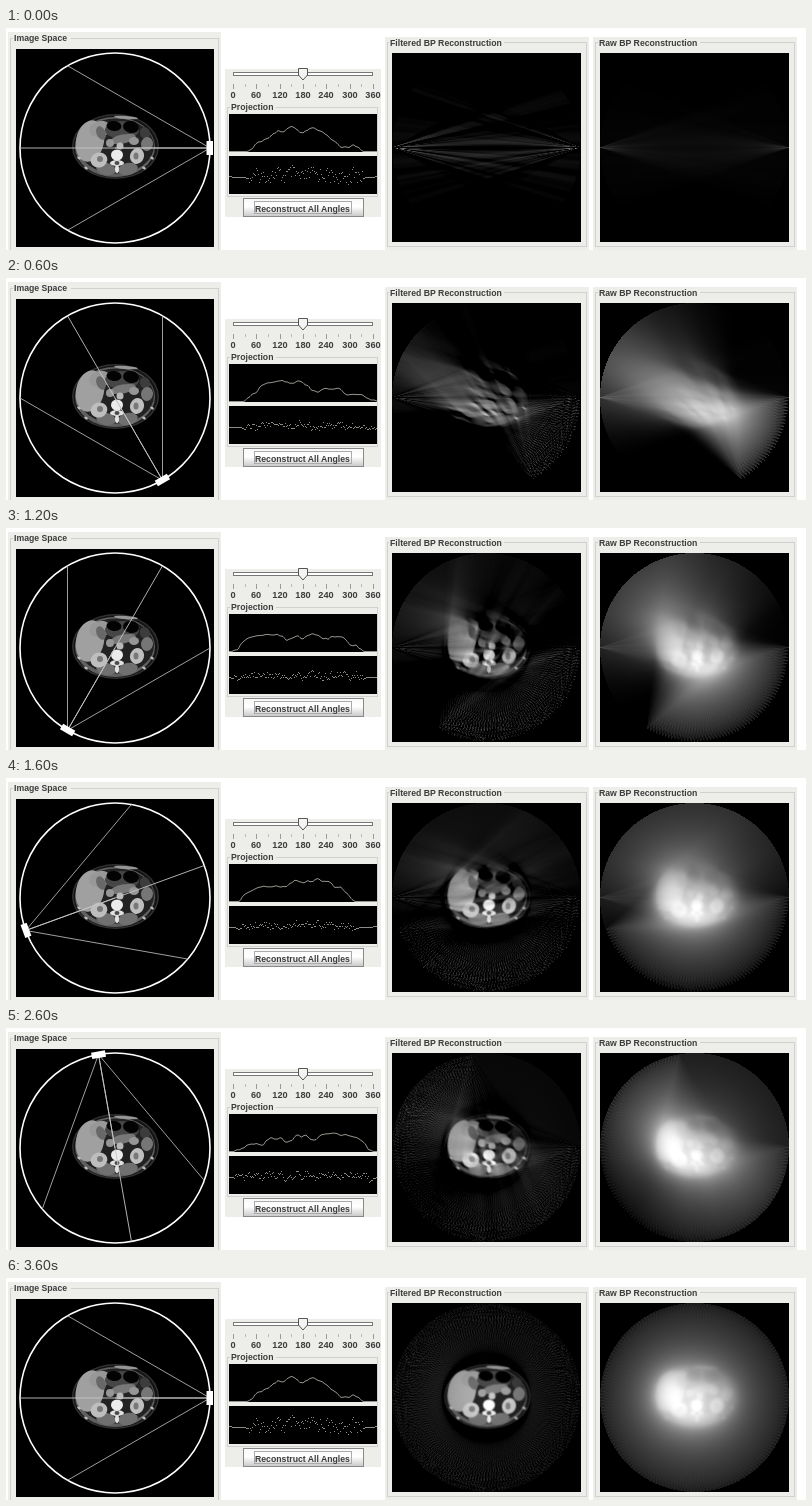
An HTML page with a canvas that plays this animation: 800x222 px, repeating every 3.8 s.

```html
<!DOCTYPE html>
<html lang="en">
<head>
<meta charset="utf-8">
<title>Fan-beam CT reconstruction</title>
<style>
  html, body { margin: 0; width: 100%; height: 100%; overflow: hidden; background: #fff; }
  svg, canvas { position: absolute; left: 0; top: 0; width: 800px; height: 222px; display: block; }
  text { font: bold 8.7px "Liberation Sans", Arial, sans-serif; fill: #3c3c3c; }
  .tick { font-size: 9.2px; text-anchor: middle; }
  .panel, .label { fill: #edeeea; }
  .border { fill: none; stroke: #d0d0d0; }
</style>
</head>
<body>
<svg viewBox="0 0 800 222">
  <rect class="panel" x="2" y="4" width="213" height="218"/>
  <rect class="panel" x="219" y="41" width="156" height="148"/>
  <rect class="panel" x="379" y="9" width="204" height="213"/>
  <rect class="panel" x="587" y="9" width="204" height="213"/>

  <rect class="border" x="4.5" y="10.5" width="208" height="220"/>
  <rect class="border" x="381.5" y="14.5" width="199" height="204"/>
  <rect class="border" x="589.5" y="14.5" width="199" height="204"/>
  <rect class="border" x="221.5" y="79.5" width="150" height="89"/>

  <rect class="label" x="7" y="5" width="58" height="10"/>
  <rect class="label" x="383" y="10" width="115" height="10"/>
  <rect class="label" x="592" y="10" width="102" height="10"/>
  <rect class="label" x="224" y="74" width="46" height="10"/>
  <text x="8" y="13">Image Space</text>
  <text x="384" y="18">Filtered BP Reconstruction</text>
  <text x="593" y="18">Raw BP Reconstruction</text>
  <text x="225" y="82">Projection</text>

  <g id="slider">
    <rect x="227.5" y="44.5" width="139" height="3" fill="#fff" stroke="#777"/>
    <path d="M292.5 40.5h9v6.5l-4.5 5l-4.5-5z" fill="#f4f4f4" stroke="#555"/>
  </g>

  <defs>
    <linearGradient id="metal" x2="0" y2="1">
      <stop stop-color="#f8f8f8"/><stop offset=".45" stop-color="#fff"/><stop offset="1" stop-color="#c8c8c8"/>
    </linearGradient>
  </defs>
  <rect x="237.5" y="170.5" width="120" height="18" fill="url(#metal)" stroke="#888"/>
  <rect x="248.5" y="173.5" width="97" height="12" fill="none" stroke="#aaa"/>
  <text x="249" y="183.5">Reconstruct All Angles</text>

  <rect x="10" y="21" width="198" height="198"/>
  <rect x="223" y="86" width="148" height="38"/>
  <rect x="223" y="128" width="148" height="38"/>
</svg>
<canvas id="stage" width="800" height="222"></canvas>

<script>
const SIZE = 189, MID = (SIZE - 1) / 2, RADIUS = 95;
const FRAMES = 19, FRAME_MS = 200, VIEWS = 180, VIEWS_PER_FRAME = 10;
const rad = degrees => degrees * Math.PI / 180;
const RAYS = 149, HALF_FAN = rad(28), RAY_STEP = 2 * HALF_FAN / (RAYS - 1);

function makeCanvas() {
  const canvas = document.createElement('canvas');
  canvas.width = canvas.height = SIZE;
  return canvas;
}

// Slider scale
const slider = document.getElementById('slider');
const svgAdd = (name, attrs, text = '') => {
  const node = document.createElementNS('http://www.w3.org/2000/svg', name);
  for (const key in attrs) node.setAttribute(key, attrs[key]);
  node.textContent = text;
  slider.append(node);
};
for (let i = 0; i <= 12; i++) {
  const x = Math.round(227 + i * 11.67) + .5, major = i % 2 === 0;
  svgAdd('path', { d: `M${x} 56v${major ? 5 : 3}`, stroke: major ? '#999' : '#bbb' });
  if (major) svgAdd('text', { x: x - .5, y: 70, class: 'tick' }, String(i * 30));
}

// Abdominal slice built from ellipses: x, y, rx, ry, tilt, gray
function drawSlice() {
  const canvas = makeCanvas();
  const c = canvas.getContext('2d', { willReadFrequently: true });
  c.fillRect(0, 0, SIZE, SIZE);
  c.translate(-14, -26);
  const blob = (x, y, rx, ry, tilt, shade) => {
    c.fillStyle = `rgb(${shade},${shade},${shade})`;
    c.beginPath();
    c.ellipse(x, y, rx, ry, tilt, 0, 7);
    c.fill();
  };
  blob(109.5, 119.5, 43.5, 32.5, 0, 48);
  blob(109.5, 119.5, 42, 31, 0, 20);
  blob(109, 120, 40, 30, 0, 96);
  blob(110, 119, 38, 27.5, 0, 34);
  blob(84, 114, 14, 21, .2, 160);
  blob(94, 102, 11, 8, -.2, 152);
  blob(95, 106, 4.5, 7, -.4, 104);
  blob(116, 103, 17, 9, 0, 70);
  blob(108, 99, 7.5, 5, .1, 3);
  blob(125, 100, 8, 6, .2, 3);
  blob(120, 90.5, 12, 1.6, .08, 150);
  blob(139, 106, 5, 6, -.4, 60);
  blob(141, 117, 6, 7, .1, 118);
  blob(117, 112, 13, 4.5, -.2, 120);
  blob(128, 114, 5, 4, 0, 150);
  blob(104, 116, 4, 4, 0, 150);
  blob(114, 119, 3.5, 3.5, 0, 185);
  blob(100, 142, 10, 6, .2, 112);
  blob(122, 142, 10, 6, -.2, 112);
  blob(93, 133, 8.5, 7.5, -.3, 190);
  blob(94, 132, 3, 3, 0, 120);
  blob(131, 129, 7, 8, .3, 190);
  blob(130, 129, 2.5, 3.5, 0, 120);
  blob(111, 128, 6, 5.5, 0, 235);
  blob(111, 136, 7, 3, 0, 225);
  blob(111, 136, 2.5, 2, 0, 75);
  blob(111, 142, 2, 4, 0, 225);
  for (const [x, y] of [[73, 131], [80, 141], [146, 131], [138, 141]]) blob(x, y, 2, 1.2, .6, 190);
  return canvas;
}

const slice = drawSlice();
const pixels = slice.getContext('2d').getImageData(0, 0, SIZE, SIZE).data;
const pixel = (col, row) => pixels[4 * (row * SIZE + col)] / 255;

function density(x, y) {
  const col = Math.floor(x + MID), row = Math.floor(y + MID);
  const u = x + MID - col, v = y + MID - row;
  return (1 - v) * ((1 - u) * pixel(col, row) + u * pixel(col + 1, row)) +
    v * ((1 - u) * pixel(col, row + 1) + u * pixel(col + 1, row + 1));
}

function project(angle) {
  const sx = RADIUS * Math.cos(angle), sy = RADIUS * Math.sin(angle);
  return Float32Array.from({ length: RAYS }, (_, j) => {
    const dir = angle + Math.PI - HALF_FAN + j * RAY_STEP;
    const dx = Math.cos(dir), dy = Math.sin(dir);
    let sum = 0;
    for (let t = 45; t < 145; t++) sum += density(sx + dx * t, sy + dy * t);
    return sum;
  });
}

// Ramp filter for equiangular fan rays, smoothed over neighbouring rays
const rampAt = n =>
  n === 0 ? 1 / (8 * RAY_STEP ** 2) :
  n % 2 ? -1 / (2 * Math.PI ** 2 * Math.sin(n * RAY_STEP) ** 2) : 0;
const kernel = Array.from({ length: RAYS }, (_, n) =>
  rampAt(n) / 2 + (rampAt(Math.abs(n - 1)) + rampAt(n + 1)) / 4);

function ramp(rays) {
  const weighted = rays.map((v, j) => v * Math.cos(j * RAY_STEP - HALF_FAN));
  return rays.map((_, j) => {
    let sum = 0;
    for (let i = 0; i < RAYS; i++) sum += weighted[i] * kernel[Math.abs(i - j)];
    return sum * RAY_STEP;
  });
}

const views = Array.from({ length: VIEWS }, (_, i) => {
  const angle = 2 * Math.PI * i / VIEWS, raw = project(angle);
  return { angle, raw, filtered: ramp(raw) };
});

const rawSum = new Float32Array(SIZE * SIZE), filteredSum = new Float32Array(SIZE * SIZE);

function backproject({ angle, raw, filtered }) {
  const cos = Math.cos(angle), sin = Math.sin(angle);
  for (let row = 0, at = 0; row < SIZE; row++) {
    for (let col = 0; col < SIZE; col++, at++) {
      const dx = col - MID - RADIUS * cos, dy = row - MID - RADIUS * sin;
      const gamma = Math.atan2(sin * dx - cos * dy, -cos * dx - sin * dy);
      const pos = (gamma + HALF_FAN) / RAY_STEP, j = Math.floor(pos);
      if (j < 0 || j >= RAYS - 1) continue;
      const mix = pos - j, weight = 1 / (Math.sqrt(dx * dx + dy * dy) + 8);
      rawSum[at] += weight * (raw[j] + mix * (raw[j + 1] - raw[j]));
      filteredSum[at] += weight * (filtered[j] + mix * (filtered[j + 1] - filtered[j]));
    }
  }
}

// Scales the sum so that the brightest point near the centre gets the given level
function toImage(sum, level) {
  const canvas = makeCanvas(), c = canvas.getContext('2d');
  const image = c.createImageData(SIZE, SIZE);
  const radius = i => Math.hypot(i % SIZE - MID, Math.floor(i / SIZE) - MID);
  let peak = 1e-9;
  sum.forEach((v, i) => { if (v > peak && radius(i) < 45) peak = v; });
  sum.forEach((v, i) => {
    const shade = radius(i) < 94.5 ? Math.max(0, v) * level / peak : 0;
    image.data.set([shade, shade, shade, 255], 4 * i);
  });
  c.putImageData(image, 0, 0);
  return canvas;
}

// The view opposite the start is already present when the sweep begins
const results = [];
backproject(views[VIEWS / 2]);
for (let k = 0, next = 0; k < FRAMES; k++) {
  for (; next <= k * VIEWS_PER_FRAME && next < VIEWS; next++) {
    if (next !== VIEWS / 2) backproject(views[next]);
  }
  results.push({
    raw: toImage(rawSum, 16 + 247 * (1 - Math.exp(-k / 1.9))),
    filtered: toImage(filteredSum, 50 + 205 * (1 - Math.exp(-k / 2.5)))
  });
}

const ctx = document.getElementById('stage').getContext('2d');
const rawPeak = Math.max(...views[0].raw);
const filteredPeak = Math.max(...views[0].filtered.map(Math.abs));
const noise = (a, b) => {
  const v = Math.sin(a * 12.9898 + b * 78.233) * 43758.5453;
  return 2 * (v - Math.floor(v)) - 1;
};

function drawGeometry(angle) {
  const center = [109, 120];
  const point = a => [109 + RADIUS * Math.cos(a), 120 + RADIUS * Math.sin(a)];
  const opposite = offset => point(angle + Math.PI + rad(offset));
  const source = point(angle);
  const ray = (end, color) => {
    ctx.strokeStyle = color;
    ctx.lineWidth = .9;
    ctx.beginPath();
    ctx.moveTo(...source);
    ctx.lineTo(...end);
    ctx.stroke();
  };
  ctx.drawImage(slice, 14, 25);
  ctx.strokeStyle = '#fff';
  ctx.lineWidth = 1.6;
  ctx.beginPath();
  ctx.arc(...center, RADIUS, 0, 7);
  ctx.stroke();
  ray(opposite(-60), '#b0b0b0');
  ray(opposite(60), '#b0b0b0');
  ray(opposite(0), '#c4c4c4');
  ray(center, '#c4c4c4');
  ctx.save();
  ctx.translate(...source);
  ctx.rotate(angle);
  ctx.fillStyle = '#fff';
  ctx.fillRect(-3.5, -7, 6.5, 14);
  ctx.restore();
}

function drawPlots({ angle, raw, filtered }, seed) {
  ctx.strokeStyle = '#a8a8a0';
  ctx.lineWidth = .9;
  ctx.beginPath();
  raw.forEach((v, j) => ctx.lineTo(223 + j * 148 / (RAYS - 1), 123.5 - 25 * v / rawPeak));
  ctx.stroke();

  const scatter = 3 + 4 * Math.exp(-40 * Math.sin(angle) ** 2);
  ctx.fillStyle = '#8c8c84';
  for (let j = 0; j < RAYS - 1; j++) {
    const spread = raw[j] > 1 ? scatter * noise(j, seed) : 0;
    ctx.fillRect(223 + j, Math.round(148 - 4 * filtered[j] / filteredPeak + spread), 1, 1);
  }
}

function draw(k) {
  const view = views[k * VIEWS_PER_FRAME % VIEWS];
  ctx.clearRect(0, 0, 800, 222);
  drawGeometry(view.angle);
  drawPlots(view, k % (FRAMES - 1));
  ctx.drawImage(results[k].filtered, 386, 25);
  ctx.drawImage(results[k].raw, 594, 25);
}

let shown = 0;
draw(0);
const start = performance.now();
function tick() {
  const k = Math.floor((performance.now() - start) / FRAME_MS) % FRAMES;
  if (k !== shown) draw(shown = k);
  requestAnimationFrame(tick);
}
requestAnimationFrame(tick);
</script>
</body>
</html>
```
